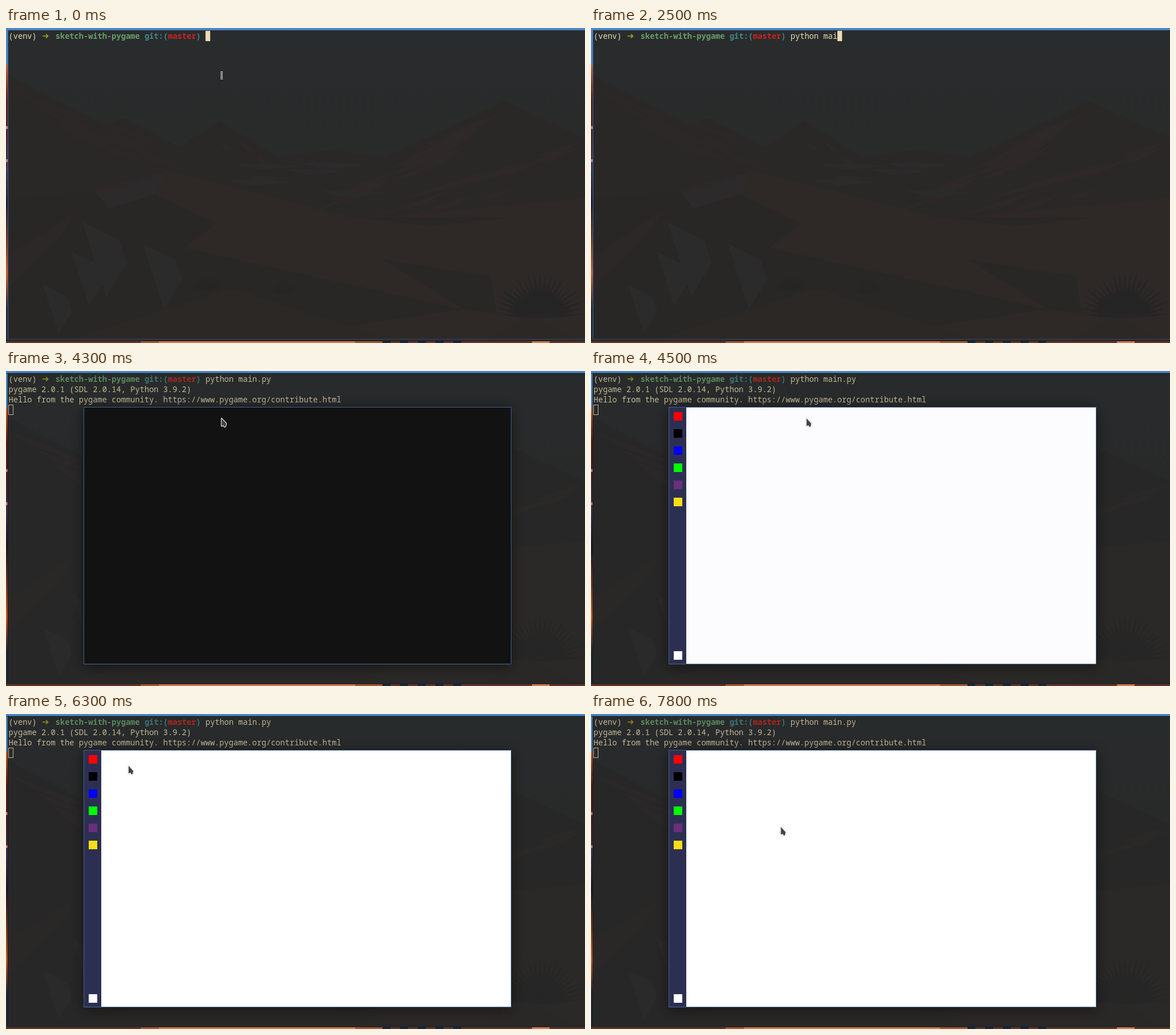
These frames come from a looping animation (1015 px wide and 552 px high, 8 s). An HTML page with a canvas:

```html
<!DOCTYPE html>
<html>
<head>
<meta charset="utf-8">
<style>
  html, body { margin: 0; width: 100%; height: 100%; overflow: hidden; background: #282828; }
  canvas { display: block; }
</style>
</head>
<body>
<canvas id="stage" width="1015" height="552"></canvas>
<script>
const c = document.getElementById('stage').getContext('2d');
const LOOP = 8000, TICK = 100, W = 1015, H = 552;
const LEFT = 4.5, CELL = 8.22, LINE = 18;
const FONT = '13.7px "Noto Sans Mono", "DejaVu Sans Mono", monospace';
const LAUNCH = 4200, OPAQUE = 4300, READY = 4500, BRIGHT = 5700;

const command = 'python main.py';
const keyTimes = [700, 1100, 1300, 1400, 1600, 1800, 1900, 2200, 2300, 2500];
const palette = ['#f00', '#000', '#00f', '#0f0', '#6b2f7b', '#f8de15'];

// pointer strokes: from, to (ms), destination of the tip
const moves = [
  [5600, 5900, 310, 192], [6000, 6400, 182, 83], [6500, 6900, 166, 81],
  [7000, 7100, 160, 79], [7700, 7800, 332, 197]
];

let seed;
function random() {
  seed = seed * 16807 % 2147483647;
  return seed / 2147483647;
}

function rect(color, x, y, w, h) {
  c.fillStyle = color;
  c.fillRect(x, y, w, h);
}

function shape(color, path) {
  c.fillStyle = color;
  c.fill(new Path2D(path + 'Z'));
}

function write(text, col, row, color, weight = 400) {
  c.font = weight + ' ' + FONT;
  c.fillStyle = color;
  c.fillText(text, LEFT + col * CELL, 18.5 + row * LINE);
}

// Skyline made of straight-sided peaks [x, height, half width] above a base line
function hills(color, base, ...peaks) {
  let path = `M0 ${H}`;
  for (let x = 0; x <= W + 5; x += 5) {
    const rise = peaks.map(([px, h, w]) => h * (1 - Math.abs(x - px) / w));
    path += `L${x} ${base - Math.max(0, ...rise)}`;
  }
  shape(color, path + `L${W + 5} ${H}`);
}

// Slivers of light running down a slope from its top
function streaks(color, x, y, dx, dy, count) {
  for (let i = 0; i < count; i++) {
    const s = random() * 0.7, len = 0.15 + random() * 0.3;
    const sx = x + dx * s, sy = y + dy * s + random() * 50;
    const ex = sx + dx * len, ey = sy + dy * len;
    shape(color, `M${sx} ${sy}Q${(sx + ex) / 2} ${(sy + ey) / 2 - 5} ${ex} ${ey}L${sx + dx * len * 0.4} ${sy + dy * len * 0.4 + 8}`);
  }
}

function shard(x, y, size) {
  shape('#2c2b2b', `M${x} ${y}l${size * 0.5} ${size * 0.25} ${size * 0.1} ${size * 0.3} ${-size * 0.28} ${size * 0.45}`);
}

function plant(x, y, radius, count) {
  for (let i = 0; i < count; i++) {
    const a = Math.PI * (1.03 + 0.94 * i / (count - 1));
    const r = radius * (0.82 + 0.18 * random());
    const dx = Math.cos(a) * r, dy = Math.sin(a) * r;
    const mx = x + dx * 0.55, my = y + dy * 0.55;
    shape('#262525', `M${x} ${y}L${mx - dy * 0.04} ${my + dx * 0.04}L${x + dx} ${y + dy}L${mx + dy * 0.04} ${my - dx * 0.04}`);
  }
}

function drawLandscape() {
  seed = 7;
  const sky = c.createLinearGradient(0, 4, 0, 230);
  sky.addColorStop(0, '#292c2d');
  sky.addColorStop(1, '#292b2a');
  rect(sky, 0, 0, W, H);

  hills('#2a2727', 235, [0, 155, 300], [205, 78, 150], [375, 72, 115], [570, 22, 150], [875, 107, 230], [1000, 46, 130]);
  streaks('#2d2828', 0, 90, 320, 130, 14);
  streaks('#2d2928', 370, 170, 110, 60, 3);
  streaks('#2e2928', 885, 135, -340, 140, 16);
  streaks('#2e2928', 1010, 195, -360, 120, 8);
  streaks('#2b2b2b', 380, 232, 280, 8, 8);

  hills('#2e2927', 335, [285, 85, 330], [1015, 37, 400]);
  shape('#2c2a2a', 'M155 303Q155 285 200 280L285 250 262 290 180 316');
  shape('#282726', 'M4 300L155 285 180 316 262 292 370 342 312 385 800 493 400 552H4');
  shape('#292726', 'M620 332H885L740 348ZM660 405L850 435 860 500 800 493');
  shape('#2c2827', 'M4 398L126 320 90 372 4 455');

  shard(134, 340, 130);
  shard(240, 378, 115);
  shard(115, 392, 95);
  shard(65, 450, 85);
  hills('#2c2826', H, [395, 96, 300], [920, 50, 90]);
  plant(352, 460, 34, 15);
  plant(487, 464, 28, 11);
  plant(936, 508, 88, 23);
}

function drawDesktopEdges(focused) {
  rect('#4a86c4', 0, 0, W, 4);

  const rocks = c.createLinearGradient(0, 65, 0, H);
  const stops = ['#cc5c2c', '#5c2014', '#4a2430', '#3c3658', '#1b1c30', '#74371f', '#d25a27', '#222b3a', '#222b3a'];
  stops.forEach((color, i) => rocks.addColorStop(i / (stops.length - 1), color));
  rect('#4a86c4', 0, 0, 3, 65);
  rect(rocks, 0, 65, 3, H - 65);
  for (const y of [172, 230]) rect('#d07868', 0, y, 3, 5);

  rect('#25282b', 3, 545, W, 4);
  rect('#64321f', 0, 549, W, 3);
  rect('#a9552f', 236, 549, 424, 3);
  rect('#d9754a', 268, 549, 344, 3);
  rect('#d9754a', 922, 549, 31, 3);
  for (let x = 660; x < 785; x += 31) rect('#1d2433', x, 547, 14, 5);

  if (focused) {
    rect('#3c5f94', 3, 4, 1, 542);
    rect('#354b68', 3, 545, W, 1);
  } else {
    rect('rgba(0,0,0,.3)', 0, 3, W, 2);
    rect('rgba(0,0,0,.25)', 2, 4, 2, 542);
  }
}

function drawPrompt() {
  write('(venv)', 0, 0, '#ebdbb2');
  c.font = 'bold 15px "DejaVu Sans", sans-serif';
  c.fillStyle = '#98971a';
  c.fillText('➜', 63, 19);
  write('sketch-with-pygame', 10, 0, '#689d6a', 700);
  write('git:(', 29, 0, '#458588', 700);
  write('master', 34, 0, '#cc241d', 700);
  write(')', 40, 0, '#458588', 700);
}

function drawTyping(t) {
  const typed = keyTimes.filter(k => t >= k).length;
  write(command.slice(0, typed), 42, 0, '#ebdbb2');
  if (t < 300 || typed) rect('#ebdbb2', LEFT + (42 + typed) * CELL, 5, CELL, LINE);
  if (!typed) drawIBeam(378, 83);
}

function drawOutput() {
  write(command, 42, 0, '#ebdbb2');
  write('pygame 2.0.1 (SDL 2.0.14, Python 3.9.2)', 0, 1, '#ebdbb2');
  write('Hello from the pygame community. https://www.pygame.org/contribute.html', 0, 2, '#ebdbb2');
  c.strokeStyle = '#ebdbb2';
  c.lineWidth = 1;
  c.strokeRect(4.5, 59.5, 8, 17);
}

function drawIBeam(x, y) {
  const path = new Path2D(`M${x - 2} ${y - 5.5}h4m-2 0v11m-2 0h4`);
  for (const [color, width] of [['#ddd', 3], ['#333', 1]]) {
    c.strokeStyle = color;
    c.lineWidth = width;
    c.stroke(path);
  }
}

function drawShadow(strength) {
  c.save();
  c.beginPath();
  c.rect(0, 0, W, H);
  c.rect(136, 63, 750, 452);
  c.clip('evenodd');
  c.shadowColor = `rgba(0,0,0,${0.5 * strength})`;
  c.shadowBlur = 22;
  c.shadowOffsetY = 3;
  rect('#000', 136, 63, 750, 452);
  c.restore();
}

function drawApp(t) {
  const opening = t < OPAQUE;
  drawShadow(opening ? 0.2 : 1);
  if (t < READY) {
    rect(`rgba(17,17,17,${opening ? 0.25 : 0.92})`, 137, 64, 748, 450);
  } else {
    rect(t < BRIGHT ? '#fcfcfe' : '#fff', 137, 64, 748, 450);
    rect('#2d2f52', 137, 64, 30, 450);
    palette.forEach((color, i) => rect(color, 145, 72 + 30 * i, 15, 15));
    rect('#fff', 145, 491, 15, 15);
  }
  c.strokeStyle = opening ? '#2c313c' : '#41628c';
  c.lineWidth = 1;
  c.strokeRect(136.5, 63.5, 749, 450);
}

// Moves run evenly across and slow down vertically, in whole ticks
function pointerAt(t) {
  const now = Math.floor(t / TICK) * TICK;
  let x = 377, y = 82;
  for (const [from, to, endX, endY] of moves) {
    const p = Math.min(1, Math.max(0, (now - from) / (to - from)));
    x += (endX - x) * p;
    y += (endY - y) * p * (2 - p);
  }
  return [x, y];
}

function drawPointer(t) {
  const [x, y] = pointerAt(t);
  c.save();
  c.translate(x + 0.8, y + 1);
  const arrow = new Path2D('M0 0V13.5L3.3 12 5.3 15.2 7.2 14.2 8.3 9Z');
  c.lineJoin = 'round';
  c.lineWidth = 2;
  c.strokeStyle = '#fff';
  c.shadowColor = 'rgba(0,0,0,.3)';
  c.shadowBlur = 2;
  c.stroke(arrow);
  c.shadowColor = 'transparent';
  c.fillStyle = '#444';
  c.fill(arrow);
  c.restore();
}

function draw(t) {
  const focused = t < LAUNCH;
  drawLandscape();
  if (!focused) rect('rgba(38,40,40,.3)', 0, 0, W, H);
  drawDesktopEdges(focused);
  c.globalAlpha = focused ? 1 : 0.8;
  drawPrompt();
  if (focused) drawTyping(t);
  else drawOutput();
  c.globalAlpha = 1;
  if (!focused) {
    drawApp(t);
    drawPointer(t);
  }
}

const start = performance.now();
function frame() {
  draw((performance.now() - start) % LOOP);
  requestAnimationFrame(frame);
}
frame();
</script>
</body>
</html>
```
